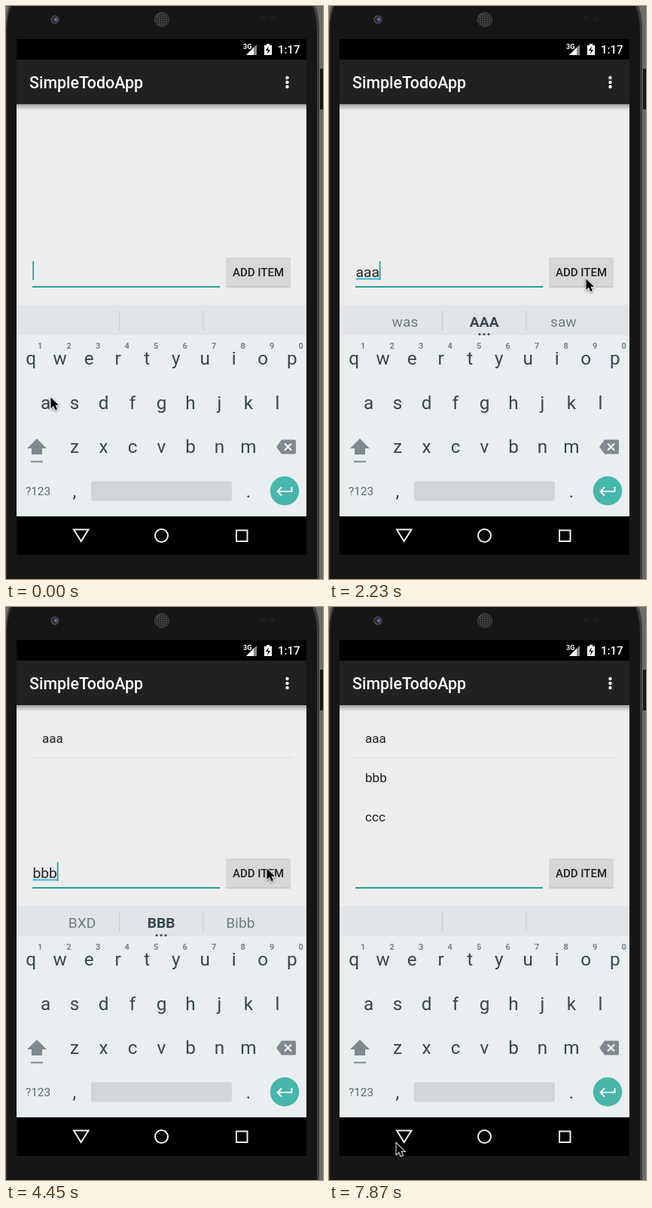
These frames come from a looping animation (421x759 px, 8 s). An HTML page with a canvas:

```html
<!DOCTYPE html>
<html lang="en">
<head>
<meta charset="utf-8">
<style>
html, body { margin: 0; width: 100%; height: 100%; overflow: hidden; background: #151515; }
canvas { display: block; }
</style>
</head>
<body>
<canvas id="stage" width="421" height="759"></canvas>
<script>
const ctx = document.getElementById('stage').getContext('2d');
const LOOP = 8000, STEP = 148.4;

// time, typed text, suggestions (the last one of a word is highlighted)
const typing = [
  [0, ''],
  [290, 'a', 'as', 'a', 'at'], [590, 'aa', 'as', 'and', 'at'], [880, 'aaa', 'was', 'AAA', 'saw'],
  [2370, ''],
  [3700, 'b', 'be', 'by', 'but'], [3850, 'bb', 'be', 'by', 'Bob'], [4000, 'bbb', 'BXD', 'BBB', 'Bibb'],
  [4600, ''],
  [5900, 'c', 'can', 'c', 'come'], [6050, 'cc', 'can', 'cc', 'come'], [6200, 'ccc', 'FXQ', 'CCC', 'CFC'],
  [7130, '']
];
const added = [[2370, 'aaa'], [4600, 'bbb'], [7130, 'ccc']];
// time, x, y of the pointer tip
const path = [
  [0, 59, 518], [740, 54, 520], [1190, 54, 520], [1790, 367, 642], [2220, 341, 361],
  [2520, 341, 361], [3260, 244, 587], [4160, 244, 587], [4450, 346, 346], [4750, 346, 346],
  [5340, 166, 584], [6530, 166, 584], [6980, 345, 350], [7130, 345, 350],
  [7715, 47, 717], [7860, 89, 710]
];

function rect(x, y, w, h, fill, r = 0) {
  ctx.fillStyle = fill;
  ctx.beginPath();
  ctx.roundRect(x, y, w, h, r);
  ctx.fill();
}

function disc(x, y, r, fill) {
  ctx.fillStyle = fill;
  ctx.beginPath();
  ctx.arc(x, y, r, 0, 7);
  ctx.fill();
}

function shape(d, fill, stroke, width = 2) {
  const p = new Path2D(d);
  if (fill) { ctx.fillStyle = fill; ctx.fill(p); }
  if (stroke) { ctx.strokeStyle = stroke; ctx.lineWidth = width; ctx.stroke(p); }
}

function text(s, x, y, size, fill, weight = 400, align = 'left') {
  ctx.font = `${weight} ${size}px Roboto, sans-serif`;
  ctx.textAlign = align;
  ctx.fillStyle = fill;
  ctx.fillText(s, x, y);
  return ctx.measureText(s).width;
}

function drawPhone() {
  rect(0, 0, 421, 759, '#6c6c6c');
  rect(417, 83, 4, 54, '#151515', 1);
  shape('M4 0H411Q416 12 416 32V759H0V32Q0 12 4 0Z', '#3d3d3d');
  shape('M7 0H407Q413 14 413 34V759H1V34Q1 14 7 0Z', '#161616');
  disc(65, 18, 5.5, '#555');
  disc(65, 18, 4.2, '#252530');
  disc(66, 18, 2.4, '#5a62a0');
  disc(207, 18, 10, '#444');
  for (let y = -8; y <= 8; y += 3)
    for (let x = -8; x <= 8; x += 3)
      if (x * x + y * y < 85) disc(207.5 + x, 18.5 + y, 1, '#151515');
  disc(341, 17, 4, '#211a1a');
  disc(354, 17, 4, '#1f1b1b');
}

function drawBars() {
  rect(14, 44, 385, 683, '#000');
  rect(14, 71, 385, 59, '#212121');
  text('3G', 315, 57, 9, '#fff', 700);
  shape('M333 51V65H319Z', '#8a8a8a');
  shape('M329 55V65H319Z', '#fff');
  shape('M346 50H350V52H353V65H343V52H346Z', '#fff');
  shape('M349 53L345 59H348L347 64L351 58H348Z', '#000');
  text('1:17', 361, 63, 15, '#fff', 500);
  text('SimpleTodoApp', 31, 108.5, 21.4, '#fff', 500);
  for (const y of [95, 101, 107]) disc(373.5, y, 2.2, '#fff');
  shape('M90 693.5H109.5L99.7 709Z', null, '#eee');
  shape('M215 701.5A8.5 8.5 0 1 1 198 701.5A8.5 8.5 0 1 1 215 701.5Z', null, '#eee');
  shape('M306 694.5H320.5V709H306Z', null, '#eee');
}

function drawContent(t, entry) {
  rect(14, 130, 385, 266, '#ededed');
  const shade = ctx.createLinearGradient(0, 130, 0, 138);
  shade.addColorStop(0, '#0005');
  shade.addColorStop(1, '#0000');
  rect(14, 130, 385, 8, shade);

  added.forEach(([time, item], i) => {
    if (t < time) return;
    text(item, 48, 180 + 52 * i, 17.1, '#212121');
    if (i === 0) rect(32, 199, 349, 1, '#dcdcdc');
  });

  const [since, typed] = entry;
  const width = text(typed, 35.5, 358.5, 19.25, '#212121');
  if (typed.length === 3) rect(35.5, 360.5, width, 2, '#2eb5dc');
  else if (typed) rect(35.5, 360, width, 1, '#333');
  if ((t - since) % 1000 < 500) rect(35.3 + width, 338, 1.8, 25, '#20a294');
  rect(35, 371, 249, 2, '#26a195');

  rect(292, 334, 86, 39, '#c4c4c4', 2);
  rect(292, 333, 86, 38.5, '#d6d7d7', 2);
  text('ADD ITEM', 335, 358, 15, '#212121', 500, 'center');
}

function drawSuggestions([, typed, ...words]) {
  rect(14, 396, 385, 42, '#e1e5e8');
  rect(150, 404, 1, 26, '#c6cbce');
  rect(261.5, 404, 1, 26, '#c6cbce');
  if (!typed) return;
  words.forEach((word, i) => {
    const bold = i === 1 && typed.length === 3;
    text(word, 101 + 105.2 * i, 425, 19.2, bold ? '#37474f' : '#707c82', bold ? 700 : 400, 'center');
  });
  for (const x of [200, 206, 212]) disc(x, 435, 1.7, '#455157');
}

function drawKeys() {
  const ink = '#37474f', gray = '#7f8a8f';
  rect(14, 437, 385, 239, '#e9eef1');
  rect(14, 436.5, 385, 1, '#f2f5f6');
  [['qwertyuiop', 33.2, 475], ['asdfghjkl', 52.5, 533.5], ['zxcvbnm', 91, 592]].forEach(([row, x, y]) =>
    [...row].forEach((key, i) => text(key, x + 38.5 * i, y, 24.3, ink, 400, 'center')));
  [...'1234567890'].forEach((n, i) => text(n, 45.2 + 38.5 * i, 454, 11, '#788388', 700, 'center'));

  shape('M41 573L54 586H48V594H34V586H28Z', gray);
  rect(33, 602.5, 16, 2, gray);
  shape('M359 584L366 574.5H383Q385 574.5 385 576.5V591.5Q385 593.5 383 593.5H366Z', gray);
  shape('M370 579.5L379 588.5M379 579.5L370 588.5', null, '#fff');

  text('?123', 42.5, 648, 15.4, '#5d6a70', 400, 'center');
  text(',', 91, 651, 24.3, ink, 400, 'center');
  text('.', 322, 651, 24.3, ink, 400, 'center');
  rect(113, 629.5, 187, 26, '#d0d5d8', 3);
  disc(370, 642.3, 19.2, '#47b6ab');
  shape('M379.5 637V643H361M366 637.5L360.5 643L366 648.5', null, '#fff');
}

function drawPointer(t) {
  const next = path.findIndex(p => p[0] > t);
  const a = path[next < 0 ? path.length - 1 : next - 1];
  const b = next < 0 ? a : path[next];
  const k = a === b ? 0 : (t - a[0]) / (b[0] - a[0]);
  const ease = k * k * (3 - 2 * k);
  ctx.save();
  ctx.translate(a[1] + (b[1] - a[1]) * ease, a[2] + (b[2] - a[2]) * ease);
  ctx.shadowColor = '#0006';
  ctx.shadowBlur = 3;
  ctx.shadowOffsetY = 1;
  const arrow = 'M.5 .5V15L4 11.8L6.5 17.3L9 16.2L6.6 10.8H11Z';
  shape(arrow, '#fff', '#fff', 1.8);
  ctx.shadowColor = 'transparent';
  shape(arrow, '#000');
  ctx.restore();
}

function draw(now) {
  const t = Math.floor((now % LOOP + 10) / STEP) * STEP;
  const entry = typing.findLast(e => e[0] <= t);
  drawPhone();
  drawBars();
  drawContent(t, entry);
  drawSuggestions(entry);
  drawKeys();
  drawPointer(t);
}

let start;
function tick(now) {
  start ??= now;
  draw(now - start);
  requestAnimationFrame(tick);
}
draw(0);
requestAnimationFrame(tick);
</script>
</body>
</html>
```
